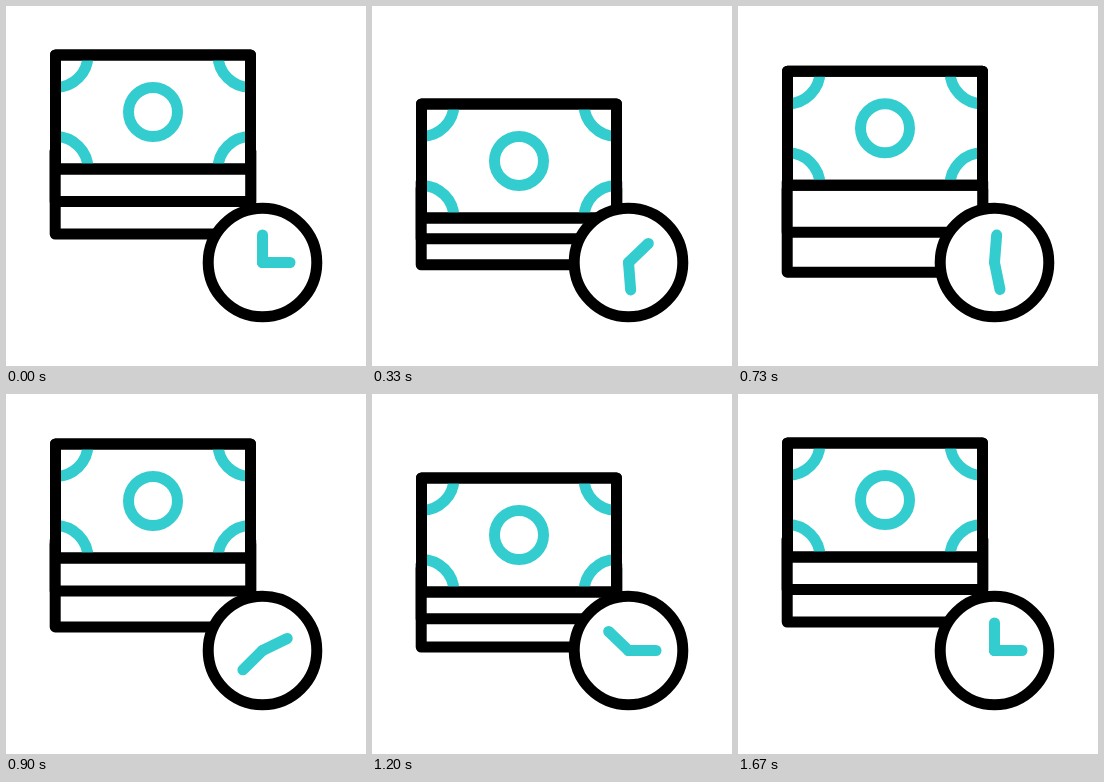
An HTML page that plays this animation: 360 by 360 pixels, repeating every 2 s.

```html
<!DOCTYPE html>
<html lang="en">
<head>
<meta charset="utf-8">
<title>Cash and clock</title>
<style>
  html, body { margin: 0; width: 100%; height: 100%; overflow: hidden; background: #fff; }
  svg { display: block; width: 100%; height: 100%; }
  .ink { fill: #fff; stroke: #000; stroke-width: 11; stroke-linejoin: round; }
  .teal { fill: none; stroke: #33cccf; stroke-width: 11; stroke-linecap: round; }
</style>
</head>
<body>
<svg viewBox="0 0 360 360">
  <clipPath id="note"><rect x="49.5" y="49" width="195" height="114"/></clipPath>
  <rect id="low" class="ink" x="49.2" y="145" width="195.5" height="83"/>
  <rect id="mid" class="ink" x="49.2" y="145" width="195.5" height="50.5"/>
  <g id="top">
    <rect class="ink" x="49.5" y="49" width="195" height="114"/>
    <g class="teal" clip-path="url(#note)">
      <circle cx="147" cy="106" r="24.5"/>
      <circle cx="49.5" cy="49" r="32.5"/>
      <circle cx="244.5" cy="49" r="32.5"/>
      <circle cx="49.5" cy="163" r="32.5"/>
      <circle cx="244.5" cy="163" r="32.5"/>
    </g>
    <rect class="ink" style="fill:none" x="49.5" y="49" width="195" height="114"/>
  </g>
  <circle class="ink" cx="256.5" cy="256.5" r="54.3"/>
  <path id="hour" class="teal" d="M256.5 256.5v-27.5"/>
  <path id="minute" class="teal" d="M256.5 256.5v-27.5"/>
</svg>
<script>
  const LOOP = 2000, FPS = 30;
  // Bounce keys: [tick, downward offset]
  const BOUNCE = [[0, 0], [14, 61.5], [26, 0], [37, 36], [47, 0]];

  const place = (id, transform) =>
    document.getElementById(id).setAttribute('transform', transform);

  function ease(x) {
    x = Math.min(1, Math.max(0, x));
    return 0.93 * x * x * (3 - 2 * x) + 0.07 * x;
  }

  function bounce(tick) {
    let y = 0;
    for (let i = 1; i < BOUNCE.length; i++) {
      const [t0, y0] = BOUNCE[i - 1], [t1, y1] = BOUNCE[i];
      y += (y1 - y0) * ease((tick - t0) / (t1 - t0));
    }
    return y;
  }

  const drop = (id, tick) => place(id, `translate(0 ${bounce(tick)})`);
  const turn = (id, angle) => place(id, `rotate(${angle} 256.5 256.5)`);

  function draw(now) {
    const tick = Math.floor((now % LOOP) * FPS / 1000 + 0.11);
    drop('top', tick);
    drop('mid', tick - 2);
    drop('low', tick - 3);
    turn('minute', 360 * ease(tick / 46));
    turn('hour', 90 + 360 * ease(tick / 32));
    requestAnimationFrame(draw);
  }

  draw(performance.now());
</script>
</body>
</html>
```
